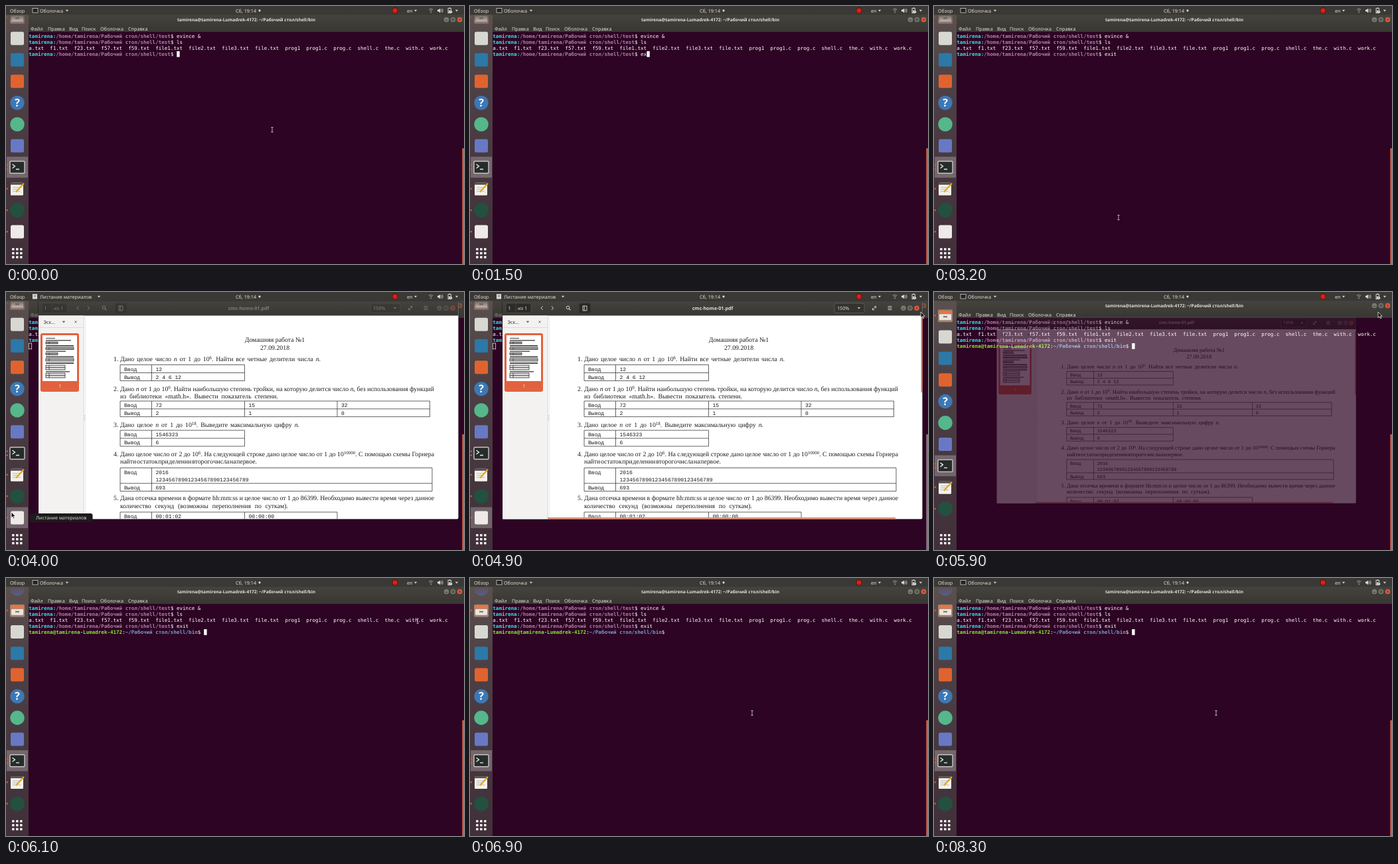
An HTML page for the animation above (8400 ms loop, 690 by 388 pixels).

```html
<!DOCTYPE html>
<html lang="ru">
<head>
<meta charset="utf-8">
<title>Desktop session</title>
<style>
  html, body { margin: 0; width: 100%; height: 100%; overflow: hidden; background: #2d0423; }
  svg { display: block; width: 690px; height: 388px; }
  text { white-space: pre; text-rendering: geometricPrecision; }
  .ui { font-family: "Noto Sans", sans-serif; font-size: 7.2px; fill: #e4e0d8; }
  .bold { font-weight: 700; }
  .mono { font-family: "DejaVu Sans Mono", monospace; font-size: 7.56px; fill: #fff; }
  .doc { font-family: "Liberation Serif", serif; font-size: 9.8px; fill: #1a1a1a; }
  .cell { font-family: "Liberation Mono", monospace; font-size: 8.05px; fill: #1a1a1a; }
</style>
</head>
<body>
<svg id="stage" viewBox="0 0 690 388" xmlns="http://www.w3.org/2000/svg"></svg>
<script>
const LOOP = 8400, SHOW = 3900, CLOSE = 5830, ENTER = 2400;
const KEYS = [1300, 1500, 1700, 1900];
const RESETS = [0, ...KEYS, ENTER, 5800];
const MOUSE = [
  [0, 401, 186], [3000, 401, 186], [3200, 278, 318], [3650, 8, 331], [4050, 8, 331],
  [4850, 679, 30], [5300, 679, 30], [5600, 672, 24], [5820, 672, 24],
  [5900, 669, 30], [6600, 425, 203], [8400, 425, 203]
];
const STEP = 32.3, CHAR = 4.55, LEFT = 34.3;
const USER = 'tamirena', HOST = 'tamirena-Lumadrek-4172';
const APP = 'Оболочка', VIEWER = 'Листание материалов';

const text = (x, y, s, cls = 'ui', more = '') => `<text x="${x}" y="${y}" class="${cls}" ${more}>${s}</text>`;
const rect = (x, y, w, h, fill, more = '') => `<rect x="${x}" y="${y}" width="${w}" height="${h}" fill="${fill}" ${more}/>`;
const dot = (x, y, r, fill, more = '') => `<circle cx="${x}" cy="${y}" r="${r}" fill="${fill}" ${more}/>`;
const line = (d, color = '#222', w = .7) => `<path d="${d}" fill="none" stroke="${color}" stroke-width="${w}"/>`;
const tri = (x, y, fill = '#d5d1c8') => `<path d="M${x - 2.2} ${y - 1.2}h4.4l-2.2 2.6z" fill="${fill}"/>`;
const tint = (color, s) => `<tspan fill="${color}" font-weight="700">${s}</tspan>`;
const mid = 'text-anchor="middle"';

// Shell window
const row = n => 47.6 + 9.1 * n;
const testPrompt = tint('#34e2e2', USER + ':') + tint('#ad7fa8', `/home/${USER}/Рабочий стол/shell/test`) + '$ ';
const binPrompt = tint('#8ae234', `${USER}@${HOST}`) + ':' + tint('#729fcf', '~/Рабочий стол/shell/bin') + '$ ';
const files = ['a.txt', 'f1.txt', 'f23.txt', 'f57.txt', 'f59.txt', 'file1.txt', 'file2.txt', 'file3.txt',
  'file.txt', 'prog1', 'prog1.c', 'prog.c', 'shell.c', 'the.c', 'with.c', 'work.c'].join('  ');
const menu = [[37, 'Файл'], [63, 'Правка'], [95, 'Вид'], [114, 'Поиск'], [142, APP], [184, 'Справка']];

function windowButtons(xs, y) {
  return xs.map((x, i) => {
    const ink = i == 2 ? '#4a2418' : '#2e2d2a';
    const sign = [`M${x - 1.5} ${y + 1}h3`, `M${x - 1.4} ${y - 1.4}h2.8v2.8h-2.8z`,
      `M${x - 1.4} ${y - 1.4}l2.8 2.8m0-2.8l-2.8 2.8`][i];
    return dot(x, y, 3.8, i == 2 ? '#e05a38' : '#7b7870') + line(sign, ink, .8);
  }).join('');
}

const shell = rect(34, 13, 656, 375, '#2d0423') +
  rect(34, 13, 656, 26, 'url(#bar)') +
  `<g id="chrome">` +
  text(362, 23, `${USER}@${HOST}: ~/Рабочий стол/shell/bin`, 'ui bold', mid + ' style="font-size:6.6px"') +
  windowButtons([663.5, 673.5, 683.5], 20.5) +
  menu.map(([x, s]) => text(x, 36.6, s)).join('') + `</g>` +
  text(LEFT, row(0), testPrompt + 'evince &amp;', 'mono') +
  text(LEFT, row(1), testPrompt + 'ls', 'mono') +
  text(LEFT, row(2), files, 'mono') +
  text(LEFT, row(3), testPrompt + '<tspan id="typed"></tspan>', 'mono') +
  `<g id="prompt">${text(LEFT, row(4), binPrompt, 'mono')}</g>` +
  rect(0, 0, 4.4, 8.8, '#fff', 'id="caret"') +
  rect(687.3, 214, 2.7, 174, '#c9604a', 'id="scroll"');

// Document page
const N = '<tspan font-style="italic">n</tspan>';
const pow = e => `10<tspan baseline-shift="3.4" font-size="6.9">${e}</tspan>`;
const para = (y, s, right) => text(172, y, s, 'doc', `data-right="${right}"`);
const item = (n, y) => text(162, y, n + '.', 'doc');

// rows: [height, ...cells]; a cell may hold several lines
function table(y, xs, rows) {
  const end = xs[xs.length - 1];
  let out = '', top = y;
  for (const [h, ...cells] of rows) {
    out += line(`M172 ${top}H${end}`);
    cells.forEach((c, i) => c.split('|').forEach((s, k) =>
      out += text(xs[i] + 6, top + 9 + 11 * k, s, 'cell')));
    top += h;
  }
  return out + line(`M172 ${top}H${end}` + xs.map(x => `M${x} ${y}V${top}`).join(''));
}

const page = text(405, 75.3, 'Домашняя работа №1', 'doc', mid) +
  text(405, 87, '27.09.2018', 'doc', mid) +
  item(1, 104) + para(104, `Дано целое число ${N} от 1 до ${pow(6)}. Найти все четные делители числа ${N}.`, 474) +
  table(109.5, [172, 219.5, 359.5], [[12, 'Ввод', '12'], [12, 'Вывод', '2 4 6 12']]) +
  item(2, 148.5) +
  para(148.5, `Дано ${N} от 1 до ${pow(9)}. Найти наибольшую степень тройки, на которую делится число ${N}, без использования функций`, 645) +
  para(159.5, 'из библиотеки «math.h». Вывести показатель степени.', 410) +
  table(164, [172, 219.5, 359.5, 499, 638.5], [[11.8, 'Ввод', '72', '15', '32'], [11.8, 'Вывод', '2', '1', '0']]) +
  item(3, 202.5) + para(202.5, `Дано целое ${N} от 1 до ${pow(18)}. Выведите максимальную цифру ${N}.`, 442) +
  table(208, [172, 219.5, 359.5], [[12, 'Ввод', '1546323'], [12, 'Вывод', '6']]) +
  item(4, 247.3) +
  para(247.3, `Дано целое число от 2 до ${pow(6)}. На следующей строке дано целое число от 1 до ${pow(10000)}. С помощью схемы Горнера`, 645) +
  para(258.3, 'найти остаток при делении второго числа на первое.', 378) +
  table(264.5, [172, 219.5, 642], [[23.3, 'Ввод', '2016|' + '1234567890'.repeat(3).slice(0, 29)], [11.7, 'Вывод', '693']]) +
  item(5, 313.3) +
  para(313.3, 'Дана отсечка времени в формате hh:mm:ss и целое число от 1 до 86399. Необходимо вывести время через данное', 645) +
  para(324.5, 'количество секунд (возможны переполнения по суткам).', 425) +
  table(331, [172, 219.5, 359.5, 499], [[12, 'Ввод', '00:01:02', '00:00:00']]);

const thumbRow = (y, h, w) => h < 3 ? rect(60, y, w, h, '#555') :
  `<rect x="60" y="${y}" width="${w}" height="${h}" fill="#ddd" stroke="#333" stroke-width=".8"/>` +
  line(`M60 ${y + h / 2}h${w}M65 ${y}v${h}`, '#333', .8);
const thumb = rect(52, 62, 58, 88, '#e2623f', 'rx="3"') + rect(55, 65, 52, 69, '#fff') +
  [[69, 1.2, 14], [72, 1.5, 38], [75, 3, 18], [80, 2, 42], [83.5, 3, 42], [88.5, 1.5, 30], [91.5, 3, 18],
    [96.5, 2, 42], [100, 4, 42], [106, 2, 42], [110, 7, 29], [119, 1.5, 36], [122, 7, 29]]
    .map(r => thumbRow(...r)).join('') +
  text(81.5, 144, '1', 'ui', mid);

const viewer = rect(48, 13.5, 634.5, 329, '#000', 'opacity=".35" rx="3"') +
  rect(49, 14, 632.5, 327.5, '#fff', 'rx="2"') +
  rect(49, 14, 632.5, 21.5, 'url(#bar)') +
  rect(49, 35.5, 68, 306, '#f3f2f0') +
  line('M49 53.5H117', '#d5d2cd') + line('M117.3 35.5V341.5', '#c9c6c1') + line('M119.8 35.5V341.5', '#e2e0dc') +
  [186, 189, 192].map(y => dot(118.5, y, .5, '#777')).join('') +
  text(56.5, 47.6, 'Эск…', 'ui', 'style="fill:#333"') + tri(87, 45, '#555') +
  line('M103.5 43.5l3 3m0-3l-3 3', '#555', .8) +
  thumb + `<g clip-path="url(#paper)">${page}</g>` +
  `<g id="overlay">${rect(679.7, 38, 1.8, 113, '#df6244')}${rect(117, 339, 524, 2.4, '#e08a76')}</g>` +
  `<g id="header">` +
  rect(54, 17, 38, 14.5, '#2c2b28', 'rx="2" stroke="#5c5a55" stroke-width=".6"') + line('M69 17.3v14', '#5c5a55', .6) +
  text(57.5, 26.8, '1') + text(72, 26.8, 'из 1') +
  line('M109.5 21.5l-2.5 2.7 2.5 2.7M123 21.5l2.5 2.7-2.5 2.7', '#ddd', 1) +
  `<circle cx="147.5" cy="23.4" r="2.3" fill="none" stroke="#ddd"/>` + line('M149.2 25.2l2.2 2.2', '#ddd', 1.1) +
  rect(164.5, 17, 17, 14.5, '#2a2926', 'rx="2"') +
  line('M170 21h6v7h-6zM172.2 21v7', '#ddd', .9) +
  text(365.5, 26.6, 'cmc-home-01.pdf', 'ui bold', mid + ' style="font-size:7.2px"') +
  rect(549, 17, 45, 14.5, '#34332f', 'rx="2" stroke="#716e67" stroke-width=".6"') +
  text(553, 26.6, '150%') + tri(586, 24.2) +
  line('M606.5 26.8l5-5m-2.6 0h2.6v2.6M606.5 24.2v2.6h2.6', '#ddd', .9) +
  line('M629.5 21.8h6m-6 2.4h6m-6 2.4h6', '#ddd', .9) +
  windowButtons([653, 663, 673], 24.2) + `</g>`;

// Dock
const plate = (y, fill) => rect(7, y - 10, 20, 20, fill, 'rx="2.5"');
const icons = [
  y => dot(17, y, 10.5, '#59608f'),
  y => rect(6, y - 9, 22, 19, '#a08272', 'rx="2"') + rect(8, y - 7, 18, 4, '#e8773f') +
       rect(8, y - 2, 18, 9, '#ebe5df', 'rx="1"') + rect(14, y + 1, 6, 2, '#7d6a60'),
  y => plate(y, '#d8d8d2'),
  y => plate(y, '#2c78a8'),
  y => plate(y, '#e0632f'),
  y => dot(17, y, 10.7, '#3d78b4') +
       text(17, y + 5.6, '?', 'ui bold', mid + ' style="font-size:16px;fill:#fff"'),
  y => dot(17, y, 10.7, '#55b78b'),
  y => plate(y, '#6878c4'),
  y => rect(6, y - 9, 22, 18, '#272c2b', 'rx="1.5" stroke="#c6c6c0" stroke-width="1.4"') +
       line(`M9.5 ${y - 4.5}l4 3-4 3M15 ${y + 3}h5`, '#eee', 1.3),
  y => rect(7, y - 9, 19, 19, '#f3f2ea', 'rx="1.5"') + rect(7, y - 9, 19, 3, '#55524d') +
       line(`M10 ${y - 2}h12m-12 3h10m-10 3h12`, '#aaa', .8) + line(`M15 ${y + 5}L27 ${y - 8}`, '#e3a52b', 2.2),
  y => dot(17, y, 11, '#23503f'),
  y => plate(y, '#eeeae8')
];
const slot = i => 16.4 + STEP * (i - 1);
const spots = [[1, 0], [8, -3], [8, 3], [9, 0], [10, 0], [11, 0]];
const wrap = (i, s) => i == 11 ? `<g id="viewerIcon">${s}</g>` : s;
const dock = rect(0, 13, 34, 375, 'url(#dockFill)') +
  `<g clip-path="url(#dockClip)"><g id="icons">` +
  icons.map((f, i) => wrap(i, f(slot(i)) +
    spots.filter(s => s[0] == i).map(s => dot(1.8, slot(i) + s[1], 1.3, '#e0532f')).join(''))).join('')
    .replace(/^/, rect(1, 0, 32, 31.5, '#fff', 'id="active" opacity=".24"')) +
  `</g></g>` + rect(0, 13, 34, 16, 'url(#fade)') +
  [0, 1, 2].map(r => [0, 1, 2].map(c => rect(9 + 6 * c, 364 + 6 * r, 3.6, 3.6, '#eee', 'rx=".8"')).join('')).join('');

// Top panel
const panel = rect(0, 0, 690, 13.3, '#3b3935') +
  text(6, 9.5, 'Обзор') +
  `<g id="shellName">${rect(40, 3.5, 8, 6.5, '#222', 'stroke="#ccc" stroke-width=".8"')}${text(51, 9.5, APP)}${tri(92, 7)}</g>` +
  `<g id="viewName">${rect(40, 3, 7, 7.5, '#ddd')}${line('M41.5 5h4m-4 2h4', '#555')}${text(51, 9.5, VIEWER)}${tri(140, 7)}</g>` +
  text(346, 9.5, 'Сб, 19:14') + dot(382, 6.8, 1.6, '#e4e0d8') +
  dot(586, 6.8, 4.7, '#57120f') + dot(586, 6.8, 3.6, '#d5211b') +
  text(604, 9.5, 'en') + tri(617, 7) +
  line('M637 5.4q3.2-2.6 6.4 0M638.4 7.2q1.8-1.5 3.6 0', '#aaa', .9) + dot(640.2, 9.3, .9, '#aaa') +
  `<path d="M650 5.6h1.8l2.4-2.2v7l-2.4-2.2h-1.8z" fill="#ddd"/>` +
  line('M655.4 5q1.4 1.9 0 3.8M657 3.8q2.4 3.1 0 6.2', '#ddd', .8) +
  rect(666, 3.6, 4.6, 7, '#3b3935', 'stroke="#ddd" stroke-width=".9"') + rect(667.2, 2.4, 2.2, 1, '#ddd') +
  rect(667, 6.5, 2.6, 3.4, '#ddd') + dot(671, 9, 1.4, '#ddd') + tri(679, 7);

const stop = (o, c, a = 1) => `<stop offset="${o}" stop-color="${c}" stop-opacity="${a}"/>`;
const gradient = (id, ...s) => `<linearGradient id="${id}" x1="0" y1="0" x2="0" y2="1">${s.join('')}</linearGradient>`;
const stage = document.getElementById('stage');
stage.innerHTML = '<defs>' +
  gradient('bar', stop(0, '#45433e'), stop(1, '#383632')) +
  gradient('dockFill', stop(0, '#5a504e'), stop(.3, '#4d4045'), stop(1, '#412f39')) +
  gradient('fade', stop(0, '#5a504e', .9), stop(1, '#5a504e', 0)) +
  '<clipPath id="dockClip"><rect y="13.3" width="34" height="344"/></clipPath>' +
  '<clipPath id="paper"><rect x="120" y="36" width="561" height="305.3"/></clipPath></defs>' +
  shell + `<g id="viewer">${viewer}</g>` + dock + panel +
  `<g id="tip">${rect(36, 333, 94.5, 13, '#1d1b1b', 'rx="3"')}${text(83.2, 342, VIEWER, 'ui', mid + ' style="font-size:7px"')}</g>` +
  `<g id="beam">${line('M-1.6-3.5h3.2M0-3.5v7M-1.6 3.5h3.2', '#c9c2c6', .9)}</g>` +
  `<g id="arrow"><path d="M0 0v8.6l2-1.8 1.5 3.1 1.4-.6-1.5-3h2.8z" fill="#111" stroke="#fff" stroke-width=".7"/></g>`;

// Justify paragraphs by spreading the gaps between words
for (const t of stage.querySelectorAll('[data-right]')) {
  const gaps = t.textContent.split(' ').length - 1;
  t.style.wordSpacing = (t.dataset.right - 172 - t.getComputedTextLength()) / gaps + 'px';
}

const el = {};
for (const e of stage.querySelectorAll('[id]')) el[e.id] = e;
const show = (e, on) => e.setAttribute('visibility', on ? 'visible' : 'hidden');
const set = (e, attrs) => { for (const k in attrs) e.setAttribute(k, attrs[k]); };
const part = (t, from, ms) => Math.min(1, Math.max(0, (t - from) / ms));
const easeOut = p => p * (2 - p);

function mouseAt(t) {
  const i = MOUSE.findIndex(m => m[0] > t);
  const [t0, x0, y0] = MOUSE[i - 1], [t1, x1, y1] = MOUSE[i];
  const p = (t - t0) / (t1 - t0), s = p * p * (3 - 2 * p);
  return [x0 + (x1 - x0) * s, y0 + (y1 - y0) * s];
}

function draw(t) {
  const open = t >= SHOW && t < CLOSE, closed = t >= CLOSE;
  const leave = easeOut(part(t, CLOSE, 150)), k = 1 - .2 * leave;
  const focus = part(t, 4050, 200);

  // shell
  const typed = KEYS.filter(at => t >= at).length;
  el.typed.textContent = 'exit'.slice(0, typed);
  show(el.prompt, closed);
  const typing = t < ENTER;
  const col = typing ? 49 + typed : closed ? 58 : 0;
  const since = t - RESETS.filter(r => r <= t).pop();
  show(el.caret, open || Math.floor(since / 600) % 2 == 0);
  set(el.caret, {
    x: LEFT + col * CHAR, y: row(typing ? 3 : 4) - 7,
    fill: open ? 'none' : '#fff', stroke: open ? '#fff' : 'none', 'stroke-width': .7
  });
  set(el.chrome, { opacity: open ? .5 : 1 });
  set(el.scroll, { fill: open && focus > .5 ? '#85757c' : '#c9604a' });

  // viewer window
  show(el.viewer, t >= SHOW && leave < 1);
  set(el.viewer, {
    opacity: 1 - leave,
    transform: `translate(365.3 178) scale(${k}) translate(-365.3 -178)`
  });
  set(el.header, { opacity: .4 + .6 * focus });
  set(el.overlay, { opacity: part(t, 4200, 200) });

  // panel and dock
  show(el.shellName, !open);
  show(el.viewName, open);
  const slide = easeOut(part(t, CLOSE, 200));
  set(el.icons, { transform: `translate(0 ${STEP * slide})` });
  set(el.active, { y: slot(open ? 11 : 8) - 15.8 });
  set(el.viewerIcon, { opacity: 1 - part(t, CLOSE, 60) });
  set(el.tip, { opacity: part(t, 3750, 120) * (1 - part(t, 4100, 150)) });

  // pointer
  const [x, y] = mouseAt(t), hidden = t >= KEYS[0] && t < 3000;
  const arrow = x < 34 || y < 39 || open;
  show(el.arrow, arrow && !hidden);
  show(el.beam, !arrow && !hidden);
  set(arrow ? el.arrow : el.beam, { transform: `translate(${x} ${y})` });
}

const start = performance.now();
function tick() {
  draw((performance.now() - start) % LOOP);
  requestAnimationFrame(tick);
}
tick();
</script>
</body>
</html>
```
